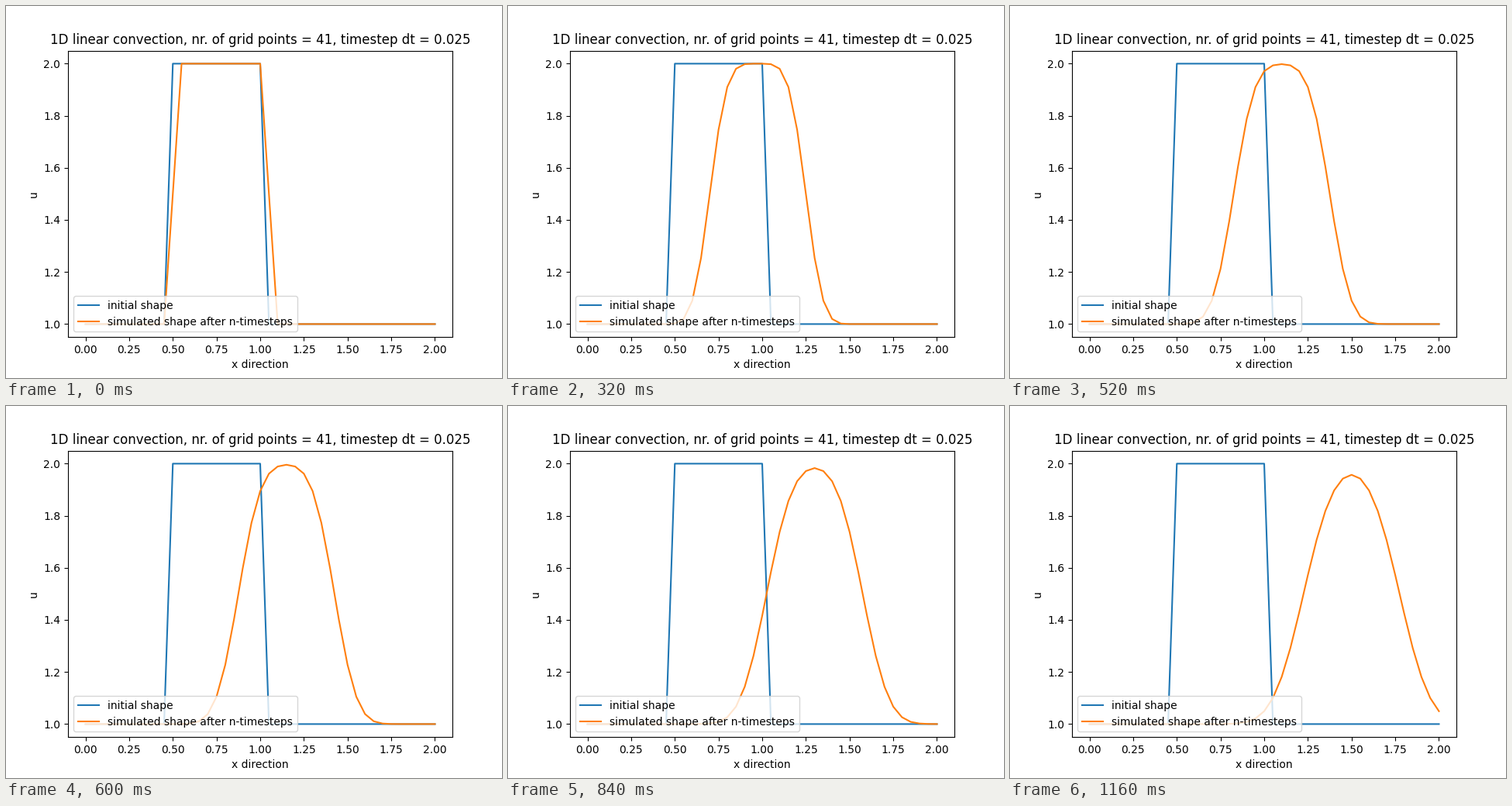
These frames come from a looping animation (640x480 px, 1200 ms). A matplotlib script:

```python
import matplotlib.pyplot as plt
import numpy as np
from matplotlib.animation import FuncAnimation

NX = 41
LENGTH = 2.0
DT = 0.025
SPEED = 1.0
STEPS = 30

dx = LENGTH / (NX - 1)
x = np.linspace(0, LENGTH, NX)


def initial_shape():
    u = np.ones(NX)
    u[round(0.5 / dx):round(1 / dx) + 1] = 2
    return u


def convect(u):
    """Advance one step with the first-order upwind scheme."""
    new = u.copy()
    new[1:] -= SPEED * DT / dx * (u[1:] - u[:-1])
    return new


states = [initial_shape()]
for _ in range(STEPS):
    states.append(convect(states[-1]))

fig, ax = plt.subplots(figsize=(6.4, 4.8), dpi=100)
ax.plot(x, states[0], label="initial shape")
(wave,) = ax.plot(x, states[1], label="simulated shape after n-timesteps")
ax.set_xlim(-0.1, 2.1)
ax.set_ylim(0.95, 2.05)
ax.set_xlabel("x direction")
ax.set_ylabel("u")
ax.set_title(f"1D linear convection, nr. of grid points = {NX}, timestep dt = {DT}")
ax.legend(loc="lower left")


def update(frame):
    wave.set_ydata(states[frame + 1])
    return (wave,)


anim = FuncAnimation(fig, update, frames=STEPS, interval=40, repeat=True, repeat_delay=0)

plt.show()
```
